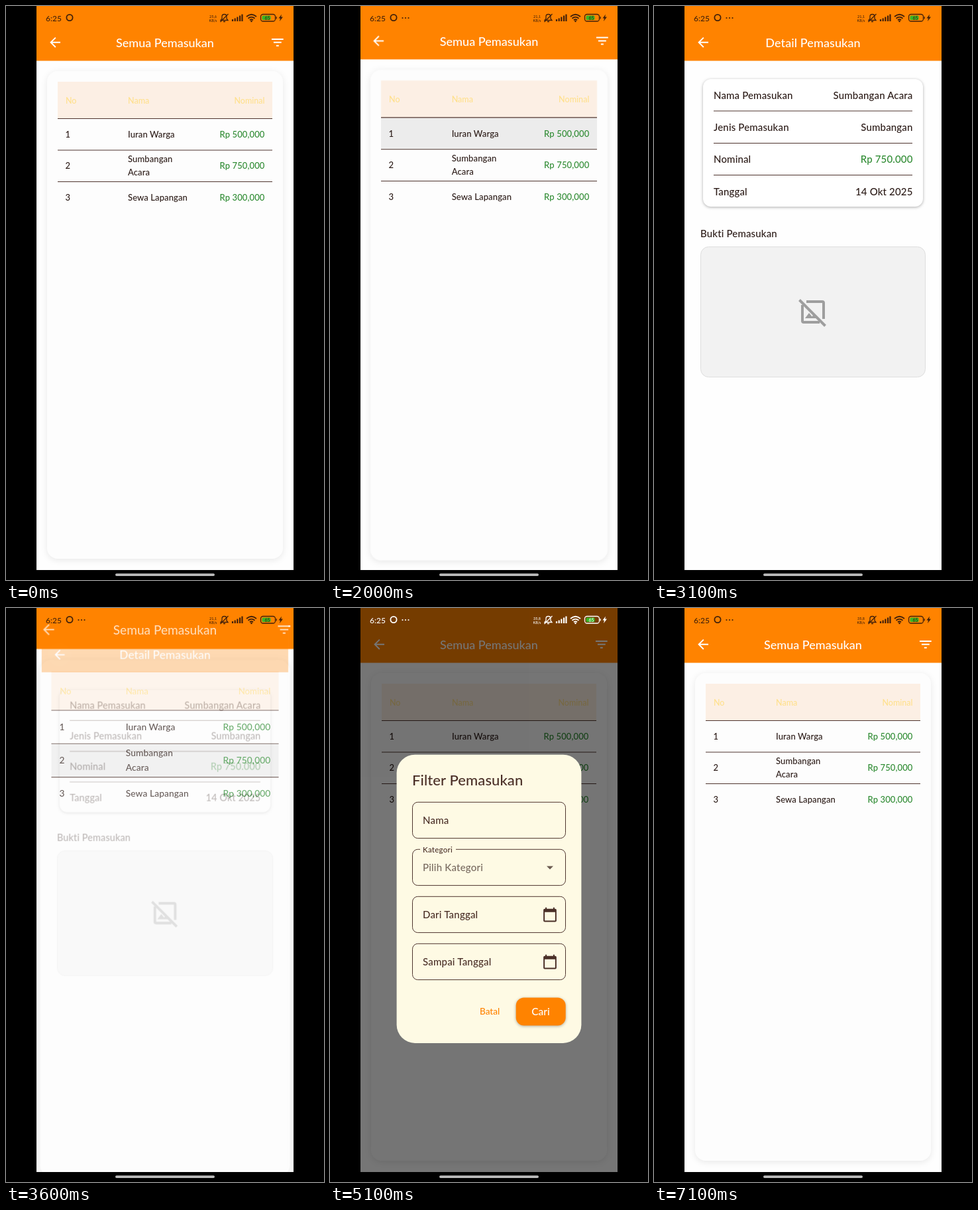
Recreate the animation shown at these times as an HTML page. Size 480 px wide and 864 px high, loop 7.7 s.

```html
<!DOCTYPE html>
<html lang="id">
<head>
<meta charset="utf-8">
<title>Semua Pemasukan</title>
<style>
html, body { margin: 0; width: 100%; height: 100%; overflow: hidden; background: #000; }
svg { display: block; width: 100vw; height: 100vh; }
text { font-family: Lato, "Open Sans", sans-serif; font-weight: 500; white-space: pre; }
.end { text-anchor: end; }
.mid { text-anchor: middle; }
.title { font-size: 18px; fill: #fff; }
.head { font-size: 12.5px; fill: #ffe08c; }
.cell { font-size: 13px; letter-spacing: .1px; fill: #2c1c18; }
.info { font-size: 15px; letter-spacing: .15px; fill: #2c1c18; }
.field { font-size: 15px; letter-spacing: .2px; fill: #4a2f27; }
.cell.money, .info.money { fill: #2e8b32; }
.rule { stroke: #4e342e; fill: none; }
.card { filter: drop-shadow(0 2px 5px rgba(0,0,0,.09)); }
.sheet { filter: drop-shadow(0 1px 2px rgba(0,0,0,.32)); }

/* One 7.7 s loop: open row 1, back, open row 2, back, filter dialog, dismiss */
.page, .scrim, .ink, .dim, #dialog, #status, .step {
  animation: 7.7s linear infinite;
  transform-origin: 240px 432px;
}
#list { animation-name: list; }
#detail { animation-name: detail, detail-fade; }
.scrim { animation-name: scrim; }
.row1 { animation-name: row1; }
.row2 { animation-name: row2; }
.back { animation-name: back; }
.filter { animation-name: filter; }
.cancel { animation-name: cancel; }
.dim { animation-name: dim; }
#dialog { animation-name: dialog; }
#status { animation-name: tint; }
.step { animation-timing-function: step-end; }
.first { animation-name: first; }
.second { animation-name: second; }
.speed1 { animation-name: speed1; }
.speed2 { animation-name: speed2; }
.speed3 { animation-name: speed3; }
.dots { animation-name: dots; }

@keyframes list {
  0% { transform: scale(1); }
  9.351%, 34.416% { transform: scale(1); animation-timing-function: cubic-bezier(.05,0,.133,.06); }
  10%, 35.065% { transform: scale(1.02); animation-timing-function: cubic-bezier(.208,.82,.25,1); }
  13.247%, 38.312% { transform: scale(1.05); }
  24.026%, 46.104% { transform: scale(1.1); animation-timing-function: cubic-bezier(.05,0,.133,.06); }
  24.675%, 46.753% { transform: scale(1.06); animation-timing-function: cubic-bezier(.208,.82,.25,1); }
  27.922%, 50%, 100% { transform: scale(1); }
}
@keyframes detail {
  0% { transform: scale(.85); }
  9.351%, 34.416% { transform: scale(.85); animation-timing-function: cubic-bezier(.05,0,.133,.06); }
  10%, 35.065% { transform: scale(.91); animation-timing-function: cubic-bezier(.208,.82,.25,1); }
  13.247%, 38.312% { transform: scale(1); }
  24.026%, 46.104% { transform: scale(1); animation-timing-function: cubic-bezier(.05,0,.133,.06); }
  24.675%, 46.753% { transform: scale(.96); animation-timing-function: cubic-bezier(.208,.82,.25,1); }
  27.922%, 50% { transform: scale(.9); }
  100% { transform: scale(.85); }
}
@keyframes detail-fade {
  0%, 9.838%, 24.834%, 34.903%, 46.912%, 100% { opacity: 0; }
  10.325%, 24.347%, 35.39%, 46.425% { opacity: 1; }
}
@keyframes scrim {
  0%, 10.16%, 20.01%, 35.22%, 42.01%, 100% { opacity: 0; }
  10.98%, 20%, 36.04%, 42% { opacity: .6; }
}
@keyframes row1 {
  0%, 7.79%, 29.2%, 100% { opacity: 0; }
  9.35%, 26% { opacity: .07; }
}
@keyframes row2 {
  0%, 32.86%, 51.3%, 100% { opacity: 0; }
  34.41%, 48.1% { opacity: .07; }
}
@keyframes back {
  0%, 22.7%, 25%, 44.8%, 47%, 100% { opacity: 0; }
  24%, 46.1% { opacity: .1; }
}
@keyframes filter {
  0%, 57.8%, 62.5%, 100% { opacity: 0; }
  59.7% { opacity: .1; }
}
@keyframes cancel {
  0%, 78.5%, 83%, 100% { opacity: 0; }
  80%, 82% { opacity: .12; }
}
@keyframes dim {
  0% { opacity: 0; }
  59.74% { opacity: 0; animation-timing-function: ease; }
  61.688% { opacity: .54; }
  80.104% { opacity: .54; animation-timing-function: cubic-bezier(.75,0,.75,.9); }
  82.052%, 100% { opacity: 0; }
}
@keyframes dialog {
  0% { opacity: 0; }
  59.74% { opacity: 0; animation-timing-function: ease-out; }
  61.688% { opacity: 1; }
  80.104% { opacity: 1; animation-timing-function: ease-in; }
  82.052%, 100% { opacity: 0; }
}
@keyframes tint {
  0%, 60.4%, 83.1%, 100% { color: #43210a; }
  61.7%, 82% { color: #fff; }
}
@keyframes first { 0% { opacity: 1; } 30%, 100% { opacity: 0; } }
@keyframes second { 0% { opacity: 0; } 30%, 100% { opacity: 1; } }
@keyframes speed1 { 0% { opacity: 1; } 9.09%, 100% { opacity: 0; } }
@keyframes speed2 { 0%, 61.04% { opacity: 0; } 9.09% { opacity: 1; } 100% { opacity: 0; } }
@keyframes speed3 { 0% { opacity: 0; } 61.04%, 100% { opacity: 1; } }
@keyframes dots { 0% { opacity: 0; } 9.09%, 100% { opacity: 1; } }
</style>
</head>
<body>
<svg viewBox="0 0 480 864">
  <defs>
    <clipPath id="screen"><path d="M46.5 0H433.5V848.3H46.5z"/></clipPath>
    <g id="bar">
      <path d="M46 0H434V82.4H46z" fill="#ff8300"/>
      <path transform="translate(62.3 43) scale(.986)" fill="#fff"
        d="M20 11H7.83l5.59-5.59L12 4l-8 8 8 8 1.41-1.41L7.83 13H20z"/>
    </g>
    <path id="calendar" transform="scale(.986)" fill="#4a2f27"
      d="M8-9H7v-2H5v2H-5v-2h-2v2h-1c-1.1 0-2 .9-2 2V9c0 1.1.9 2 2 2H8c1.1 0 2-.9 2-2V-7c0-1.1-.9-2-2-2zM8 9H-8V-4H8z"/>
  </defs>

  <path d="M0 0H480V864H0z"/>
  <g clip-path="url(#screen)">
    <path d="M46 0H434V849H46z" fill="#fff"/>
    <path d="M46 0H434V82H46z" fill="#ff8300"/>

    <g id="list" class="page">
      <path d="M46 0H434V864H46z" fill="#fefefe"/>
      <use href="#bar"/>
      <circle class="ink filter" cx="410" cy="55" r="19" fill="#fff"/>
      <path transform="translate(398 43) scale(.986)" fill="#fff" d="M10 18h4v-2h-4zM3 6v2h18V6zM6 13h12v-2H6z"/>
      <text class="title mid" x="240" y="62">Semua Pemasukan</text>
      <rect class="card" x="62" y="98" width="356" height="734" rx="16" fill="#fdfdfd"/>
      <path d="M78 114H402V169.5H78z" fill="#fcefe4"/>
      <path class="ink row1" d="M78 170H402V217H78z"/>
      <path class="ink row2" d="M78 217H402V264.5H78z"/>
      <path class="rule" d="M78 169.5H402M78 217H402M78 264.5H402"/>
      <g class="head">
        <text x="90" y="147">No</text>
        <text x="184" y="147">Nama</text>
        <text class="end" x="390.5" y="147">Nominal</text>
      </g>
      <text class="cell" x="89.5" y="198">1</text>
      <text class="cell" x="184" y="198">Iuran Warga</text>
      <text class="cell money end" x="390.5" y="198">Rp 500,000</text>
      <text class="cell" x="89.5" y="245">2</text>
      <text class="cell" x="184" y="235">Sumbangan</text>
      <text class="cell" x="184" y="255">Acara</text>
      <text class="cell money end" x="390.5" y="245">Rp 750,000</text>
      <text class="cell" x="89.5" y="292.5">3</text>
      <text class="cell" x="184" y="292.5">Sewa Lapangan</text>
      <text class="cell money end" x="390.5" y="292.5">Rp 300,000</text>
    </g>

    <path class="scrim" d="M46 0H434V849H46z" fill="#fffbe6"/>

    <g id="detail" class="page">
      <path d="M46 0H434V864H46z" fill="#fefefe"/>
      <use href="#bar"/>
      <circle class="ink back" cx="74" cy="55" r="19" fill="#fff"/>
      <text class="title mid" x="240" y="62" letter-spacing=".1">Detail Pemasukan</text>
      <rect class="sheet" x="74" y="110" width="332" height="192" rx="12" fill="#fff"/>
      <path class="rule" d="M90 158H390M90 206.5H390M90 254.5H390"/>
      <text class="info" x="90" y="139.5">Nama Pemasukan</text>
      <text class="info" x="90" y="188">Jenis Pemasukan</text>
      <text class="info" x="90" y="236">Nominal</text>
      <text class="info" x="90" y="284.5">Tanggal</text>
      <g class="step first">
        <text class="info end" x="390.5" y="139.5">Iuran Warga</text>
        <text class="info end" x="390.5" y="188">Iuran</text>
        <text class="info money end" x="390.5" y="236">Rp 500.000</text>
        <text class="info end" x="390.5" y="284.5">14 Okt 2025</text>
      </g>
      <g class="step second">
        <text class="info end" x="390.5" y="139.5">Sumbangan Acara</text>
        <text class="info end" x="390.5" y="188">Sumbangan</text>
        <text class="info money end" x="390.5" y="236">Rp 750.000</text>
        <text class="info end" x="390.5" y="284.5">14 Okt 2025</text>
      </g>
      <text class="info" x="70" y="347.5">Bukti Pemasukan</text>
      <rect x="70.5" y="362.5" width="339" height="196" rx="12" fill="#f2f2f2" stroke="#dedede"/>
      <g fill="none" stroke="#9e9e9e" stroke-width="4">
        <path d="M230 445H254Q256 445 256 447V471M224 450V474Q224 476 226 476H250M219.5 442.5L258.5 481.5"/>
        <path d="M228 470L234 462L238.5 467.5L240.5 465L246 470z" fill="#9e9e9e" stroke="none"/>
      </g>
    </g>

    <path class="dim" d="M46 0H434V849H46z"/>

    <g id="dialog">
      <rect x="100.6" y="220.7" width="278.8" height="434.2" rx="27.6" fill="#fefae4"/>
      <text x="124" y="267" font-size="22" letter-spacing=".1" fill="#4a2f27">Filter Pemasukan</text>
      <g class="rule">
        <rect x="124.5" y="292.3" width="231" height="54.3" rx="8"/>
        <rect x="124.5" y="363.3" width="231" height="54.3" rx="8"/>
        <rect x="124.5" y="434.3" width="231" height="54.3" rx="8"/>
        <rect x="124.5" y="505.3" width="231" height="54.3" rx="8"/>
      </g>
      <path d="M136 361H190V366H136z" fill="#fefae4"/>
      <text x="140" y="367.5" font-size="11.5" letter-spacing=".25" fill="#4a2f27">Kategori</text>
      <text class="field" x="140" y="325">Nama</text>
      <text class="field" x="140" y="396" style="fill:#786a5f">Pilih Kategori</text>
      <path d="M327 388.5H337L332 393.5z" fill="#6b5a50"/>
      <text class="field" x="140" y="467">Dari Tanggal</text>
      <text class="field" x="140" y="538">Sampai Tanggal</text>
      <use href="#calendar" x="332" y="461.6"/>
      <use href="#calendar" x="332" y="532.6"/>
      <rect class="ink cancel" x="214" y="588" width="55" height="39" rx="19.5" fill="#ff8300"/>
      <text x="226" y="612" font-size="13.5" fill="#ff8300">Batal</text>
      <rect class="sheet" x="280.7" y="586.4" width="75" height="42.2" rx="12" fill="#ff8300"/>
      <text class="mid" x="318" y="612.5" font-size="15.5" fill="#fff">Cari</text>
    </g>
  </g>

  <g id="status" fill="currentColor">
    <text x="60" y="22.5" font-size="12">6:25</text>
    <circle cx="96" cy="17.5" r="4.6" fill="none" stroke="currentColor" stroke-width="1.8"/>
    <g class="step dots">
      <circle cx="109.5" cy="18" r="1.1"/>
      <circle cx="114" cy="18" r="1.1"/>
      <circle cx="118.5" cy="18" r="1.1"/>
    </g>
    <g class="mid" font-size="5.5">
      <text class="step speed1" x="312.5" y="17.5">25,6</text>
      <text class="step speed2" x="312.5" y="17.5">21,1</text>
      <text class="step speed3" x="312.5" y="17.5">35,8</text>
      <text x="312.5" y="23.5">KB/s</text>
    </g>
    <g fill="none" stroke="currentColor" stroke-width="1.3">
      <path d="M324 21.5H335L333 19V16Q333 12.5 329.5 12.5T326 16V19zM328 23.5H331M323.5 24L335.5 12"/>
      <path d="M342 20V23M345.7 18.5V23M349.4 16.5V23M353.1 14.5V23M356.5 12.5V23" stroke-width="2.2"/>
      <path d="M363 16Q370.5 9.5 378 16M365.5 18.7Q370.5 14.5 375.5 18.7M368 21.3Q370.5 19.3 373 21.3" stroke-width="1.8"/>
      <rect x="384.5" y="12.5" width="22" height="10.5" rx="3.5"/>
    </g>
    <circle cx="370.5" cy="23" r="1.3"/>
    <rect x="386.5" y="14.5" width="13" height="6.5" rx="1.5" fill="#39b526"/>
    <text class="mid" x="394.5" y="20.5" font-size="7">65</text>
    <path d="M407.5 16H408.8V19.5H407.5zM416 12.5L411.5 18.5H414L413 23L418 16.5H415.2z"/>
  </g>
  <rect x="165" y="854.2" width="150" height="3.8" rx="1.9" fill="#bcbcbc"/>
</svg>
</body>
</html>
```
